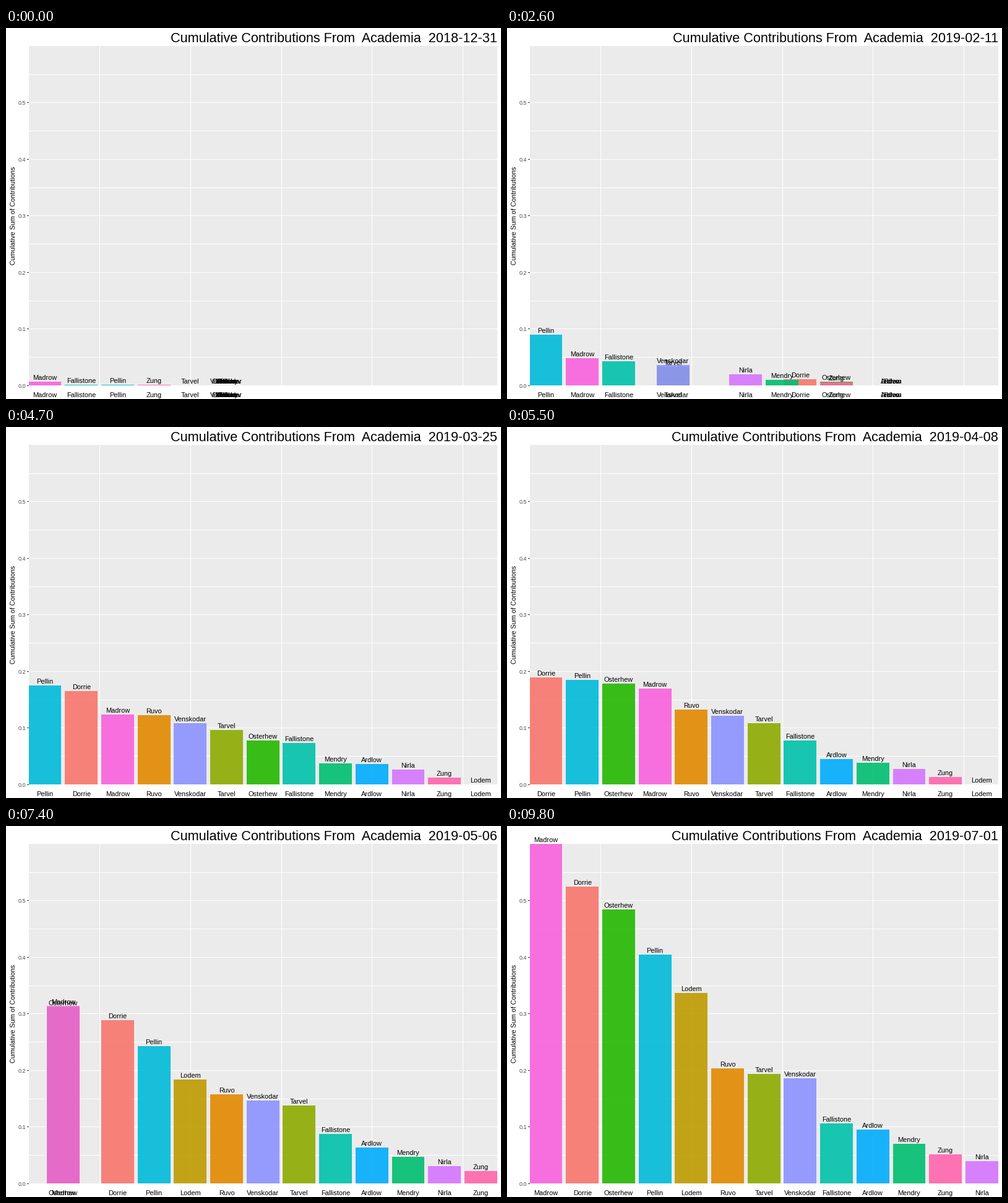
Write a matplotlib script that moves like this. It is 800x600 px and loops after 10000 ms.

```python
import numpy as np
import matplotlib.pyplot as plt
from matplotlib.animation import FuncAnimation
from matplotlib.patches import Rectangle

W, H, DPI = 800, 600, 100
LEFT, RIGHT, TOP, BASE = 37, 794, 29, 578
STEP = (RIGHT - LEFT) / 12.9      # distance between ranks
BAR = 0.9 * STEP
X0 = LEFT - 0.32                  # left edge of the first bar before rounding
SCALE = (BASE - TOP) / 0.6        # pixels per unit of contribution
LAST = 26
QUARTER_END = 12
START = np.datetime64("2018-12-31")

plt.rcParams["font.family"] = "Liberation Sans"

# name: launch week, early growth power, total at the pivot week,
#       late growth power, final total
CANDIDATES = {
    "Dorrie": (6, 1.15, .165, 1.4, .5246),
    "Ruvo": (9, 1, .1222, 1.1, .2033),
    "Lodem": (15, 1, .132, 1, .3366),
    "Tarvel": (-.1, 1.8, .0963, 1.1, .1934),
    "Osterhew": (2, 3.2, .0776, .72, .484),
    "Mendry": (1, 1.9, .0372, 1.6, .07),
    "Fallistone": (-.1, .9, .0732, 1.1, .106),
    "Pellin": (-.1, 1.1, .175, 1.6, .4044),
    "Ardlow": (7, .35, .0361, 1, .095),
    "Venskodar": (5, .7, .108, .9, .1858),
    "Nirla": (0, .5, .0262, 1.5, .0393),
    "Madrow": (-6, 2.6, .1235, 1.2, .6),
    "Zung": (-3, 1.8, .012, 1.8, .0514),
}


def weekly_totals(launch, early, middle, late, final):
    """Power growth up to the pivot week, then another one to the end."""
    week = np.arange(LAST + 1)
    pivot = max(QUARTER_END, launch + 1)
    rise = np.clip((week - launch) / (pivot - launch), 0, 1) ** early
    rest = np.clip((week - pivot) / (LAST - pivot), 0, 1) ** late
    return middle * rise + (final - middle) * rest


def hue_color(i, count, chroma=100, light=65):
    """Evenly spaced hues of equal lightness (polar CIE-LUV to sRGB)."""
    angle = np.radians(15 + 360 * i / count)
    u = chroma * np.cos(angle) / (13 * light) + 0.19784
    v = chroma * np.sin(angle) / (13 * light) + 0.46834
    y = ((light + 16) / 116) ** 3
    x = 9 * y * u / (4 * v)
    z = 3 * y / v - 5 * y - x / 3
    rgb = np.array([3.2405 * x - 1.5372 * y - 0.4985 * z,
                    -0.9693 * x + 1.8760 * y + 0.0416 * z,
                    0.0556 * x - 0.2040 * y + 1.0572 * z])
    rgb = np.clip(rgb, 0, 1)
    return np.where(rgb > 0.0031308, 1.055 * rgb ** (1 / 2.4) - 0.055, 12.92 * rgb)


values = np.array([weekly_totals(*c) for c in CANDIDATES.values()])
# tied candidates share the best rank
ranks = (values[None, :, :] > values[:, None, :]).sum(axis=1)

# each week holds for a few frames, with one halfway frame in between
timeline = []
for week in range(LAST + 1):
    timeline += [week] * (2 if week == 0 or week > 20 else 3)
    if week < LAST:
        timeline.append(week + 0.5)

fig = plt.figure(figsize=(W / DPI, H / DPI), dpi=DPI, facecolor="white")
ax = fig.add_axes([0, 0, 1, 1])
ax.set_xlim(0, W)
ax.set_ylim(H, 0)
ax.axis("off")


def box(x, y, w, h, color, z=0, alpha=1):
    return ax.add_patch(Rectangle((x, y), w, h, fc=color, lw=0,
                                  alpha=alpha, zorder=z))


def label(x, y, text, size=11, color="black", ha="center", va="baseline", **kw):
    return ax.text(x, y, text, fontsize=size * 72 / DPI, color=color,
                   ha=ha, va=va, zorder=5, **kw)


box(LEFT, TOP, RIGHT - LEFT, BASE - TOP, "#EBEBEB")
for i in range(12):
    y = BASE - i * 0.05 * SCALE
    row = np.ceil(y - 0.5)
    box(LEFT, row, RIGHT - LEFT, 1, "white", 1)
    if i % 2 == 0:
        box(LEFT - 3, row, 3, 1, "#333333", 1)
        label(LEFT - 5, y + 3.7, f"{i * 0.05:.1f}", 9, "#4D4D4D", ha="right")
for rank in np.arange(2.5, 13, 2.5):
    box(round(X0 + (rank - 0.55) * STEP), TOP, 1, BASE - TOP, "white", 1)

label(12, 303.5, "Cumulative Sum of Contributions", 10.8,
      va="center", rotation=90)
title = label(RIGHT, 23, "", 21.65, ha="right")

bars, tops, names = [], [], []
for i, name in enumerate(CANDIDATES):
    bars.append(box(0, BASE, BAR, 0, hue_color(i, len(CANDIDATES)), 2, 0.9))
    tops.append(label(0, 0, name))
    names.append(label(0, 597, name))


def update(frame):
    pos = timeline[frame]
    a, b = int(np.floor(pos)), int(np.ceil(pos))
    heights = (values[:, a] + values[:, b]) / 2 * SCALE
    lefts = X0 + (ranks[:, a] + ranks[:, b]) / 2 * STEP
    for bar, top, name, h, x in zip(bars, tops, names, heights, lefts):
        bar.set_bounds(x, BASE - h, BAR, h)
        top.set_position((x + BAR / 2, BASE - h - 3))
        name.set_position((x + BAR / 2, 597))
    title.set_text(f"Cumulative Contributions From  Academia  {START + 7 * a}")
    return [*bars, *tops, *names, title]


anim = FuncAnimation(fig, update, frames=len(timeline), interval=100,
                     repeat=True, repeat_delay=0, blit=False)
plt.show()
```
